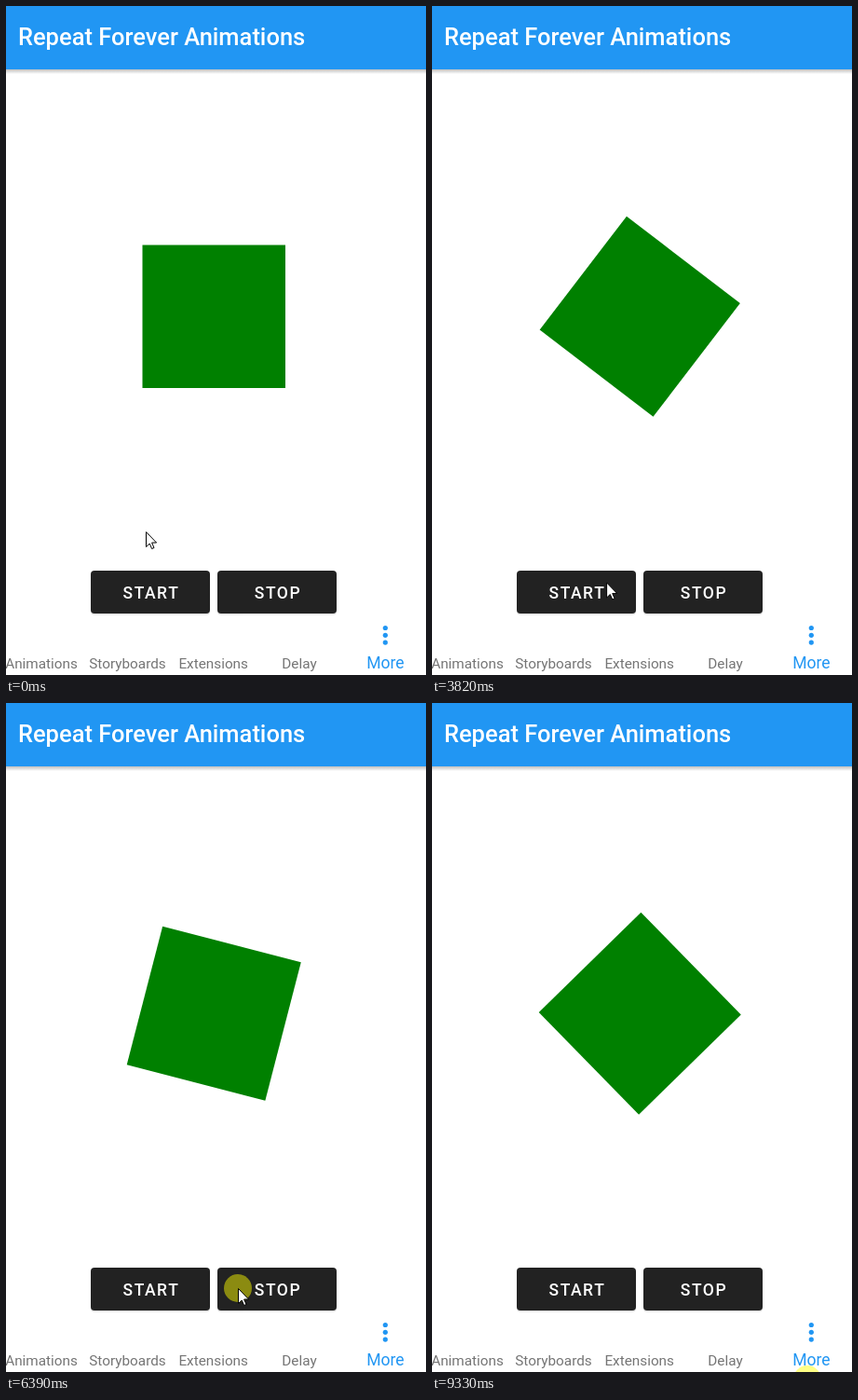
Animation, 451 px wide and 718 px high, one loop 9560 ms. Source, as an HTML page:

```html
<!DOCTYPE html>
<html lang="en">
<head>
<meta charset="utf-8">
<title>Repeat Forever Animations</title>
<style>
  html, body { margin: 0; height: 100%; overflow: hidden; background: #fff; }
  svg { display: block; font-family: Roboto, sans-serif; }
  .title { font-size: 25.5px; font-weight: 500; fill: #fff; }
  .label { font-size: 17.5px; font-weight: 500; letter-spacing: .0893em; fill: #fff; text-anchor: middle; }
  .tabs { font-size: 15.3px; fill: #757575; text-anchor: middle; }
  .more { font-size: 17.6px; fill: #2196f3; }
</style>
</head>
<body>
<svg width="451" height="718" viewBox="0 0 451 718">
  <defs>
    <linearGradient id="shade" x2="0" y2="1">
      <stop stop-color="#000" stop-opacity=".3"/>
      <stop offset="1" stop-color="#000" stop-opacity="0"/>
    </linearGradient>
  </defs>
  <rect y="67" width="451" height="6" fill="url(#shade)"/>
  <rect width="451" height="68" fill="#2196f3"/>
  <text class="title" x="13" y="42">Repeat Forever Animations</text>

  <rect id="square" x="146.5" y="256.5" width="153.5" height="153.5" fill="#008000"/>

  <g fill="#000" opacity=".12">
    <rect x="91" y="607" width="128" height="46.5" rx="4"/>
    <rect x="227" y="607" width="128" height="46.5" rx="4"/>
  </g>
  <rect id="start" x="91" y="606" width="128" height="46" rx="4"/>
  <rect id="stop" x="227" y="606" width="128" height="46" rx="4"/>
  <text class="label" x="156" y="636">START</text>
  <text class="label" x="292" y="636">STOP</text>

  <g class="tabs">
    <text x="38" y="711">Animations</text>
    <text x="130.5" y="711">Storyboards</text>
    <text x="222.7" y="711">Extensions</text>
    <text x="315" y="711">Delay</text>
    <g class="more">
      <text x="407.4" y="711">More</text>
      <circle cx="407.3" cy="667.5" r="2.6"/>
      <circle cx="407.3" cy="675.3" r="2.6"/>
      <circle cx="407.3" cy="683.1" r="2.6"/>
    </g>
  </g>

  <g id="pointer">
    <circle id="highlight" r="15" fill="#ff0" opacity=".48"/>
    <path d="M.5 .5V16.5L4.2 13L6.6 18.5L9 17.5L6.6 12H11.6Z" fill="#fff" stroke="#000"/>
  </g>
</svg>
<script>
const LOOP = 9560, TICK = 77.5;
const TURN = 1000, PAUSE = 68;    // one rotation, then a short wait before the next
const LATENCY = 28;               // from releasing START to the first movement
const SETTLE = 160;               // the pointer rests this long before a click

const home = { x: 150, y: 564 };
const clicks = [
  { press: 620, release: 860, x: 150, y: 606 },
  { press: 1880, release: 2110, x: 171, y: 617, button: 'start' },
  { press: 4330, release: 4658, x: 303, y: 629, button: 'stop' },
  { press: 5450, release: 5680, x: 176, y: 628, button: 'start' },
  { press: 6370, release: 6876, x: 249, y: 628, button: 'stop' },
  { press: 7300, release: 7610, x: 190, y: 641, button: 'start' },
  { press: 8150, release: 8501, x: 249, y: 642, button: 'stop' },
  { press: 9330, release: LOOP, x: 403, y: 726 }
];

const el = id => document.getElementById(id);
const clamp = v => Math.min(1, Math.max(0, v));
const smooth = p => p * p * (3 - 2 * p);

// The first turn goes from the resting angle to 360, every later one from 0.
function spin(from, elapsed) {
  const turn = Math.floor(elapsed / (TURN + PAUSE));
  const first = turn < 1 ? from : 0;
  return first + (360 - first) * clamp((elapsed - turn * (TURN + PAUSE)) / TURN);
}

function angleAt(t) {
  let angle = 0, begin = Infinity;
  for (const { button, release } of clicks) {
    if (button === 'start') begin = release + LATENCY;
    const end = button === 'stop' ? release : Infinity;
    if (button !== 'stop' || begin > t) continue;
    angle = spin(angle, Math.min(t, end) - begin);
  }
  return angle;
}

function tipAt(t) {
  let { x, y } = home;
  for (const c of clicks) {
    const dx = c.x - x, dy = c.y - y;
    const duration = 40 * Math.sqrt(Math.hypot(dx, dy));
    const p = smooth(clamp(1 + (t - c.press + SETTLE) / duration));
    x += dx * p;
    y += dy * p;
    if (p < 1) break;
  }
  return [x, y];
}

function buttonColor(id, t) {
  const last = clicks.findLast(c => c.button === id && c.release <= t);
  const age = last ? t - last.release : LOOP;
  const level = Math.round(34 + 35 * Math.min(clamp(age / 200), clamp((680 - age) / 180)));
  return `rgb(${level},${level},${level})`;
}

function draw(t) {
  // The screen refreshes about 13 times a second.
  const shown = 2105 + Math.floor((t - 2105) / TICK) * TICK;
  el('square').setAttribute('transform', `rotate(${angleAt(shown)} 223.25 333.25)`);
  el('pointer').setAttribute('transform', `translate(${tipAt(shown)})`);
  el('highlight').style.display = clicks.some(c => t >= c.press && t < c.release) ? '' : 'none';
  for (const id of ['start', 'stop']) el(id).setAttribute('fill', buttonColor(id, shown));
}

let origin;
function frame(now) {
  origin ??= now;
  draw((now - origin) % LOOP);
  requestAnimationFrame(frame);
}
draw(0);
requestAnimationFrame(frame);
</script>
</body>
</html>
```
